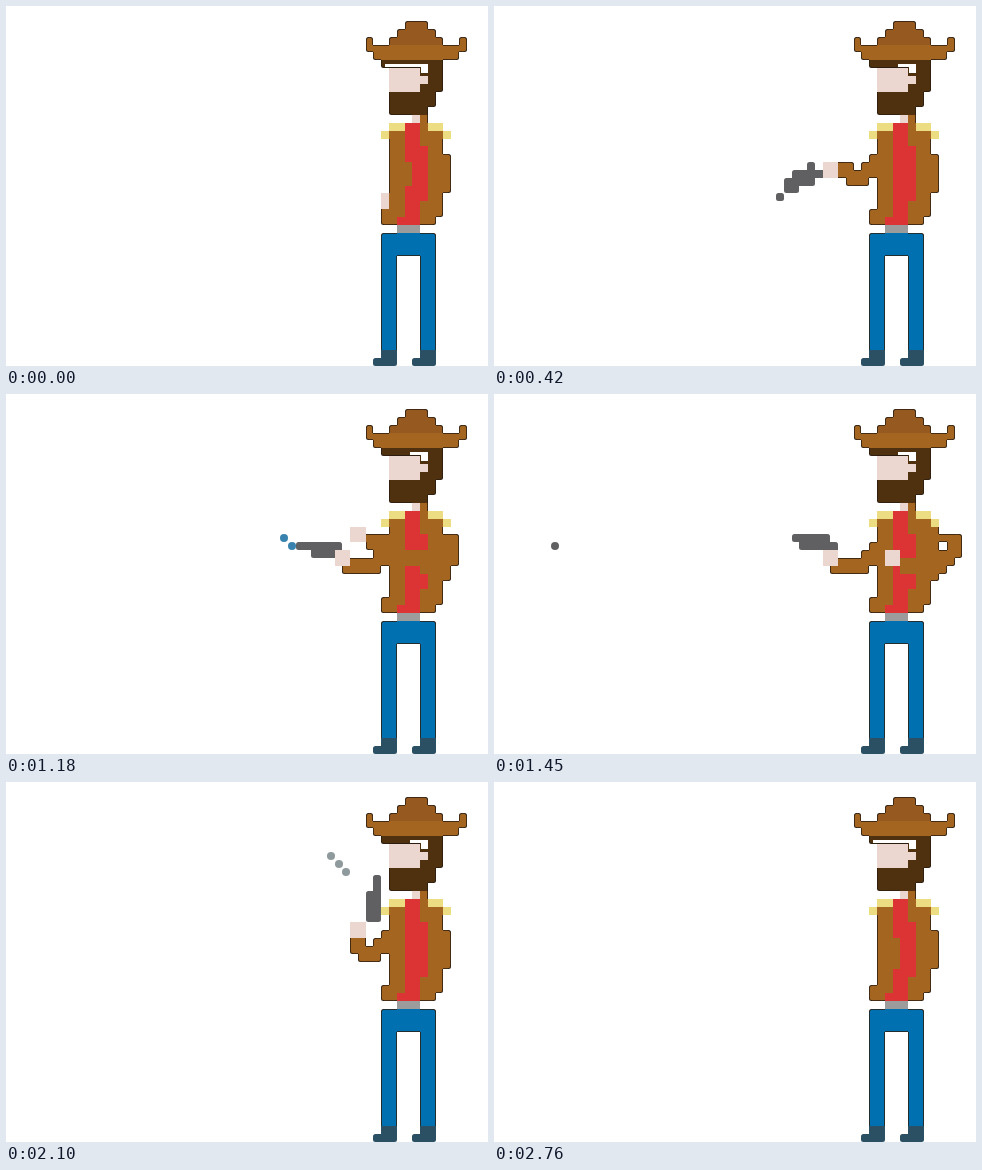
Recreate the animation shown at these times as an HTML page with a canvas. Size 482 px wide and 360 px high, loop 3.26 s.

```html
<!DOCTYPE html>
<html lang="en">
<head>
<meta charset="utf-8">
<title>Cowboy draw</title>
<style>
html, body { margin: 0; width: 100%; height: 100%; overflow: hidden; background: #fff; }
canvas { display: block; width: 482px; height: 360px; }
</style>
</head>
<body>
<canvas id="stage" width="482" height="360"></canvas>
<script>
const ctx = document.getElementById('stage').getContext('2d');
const LOOP = 3260;
const INK = '#2a1d10';
const COLORS = {
  coat: '#a46520', crown: '#965a20', hair: '#4f300f', jeans: '#0070b0', skin: '#ecd7d0', red: '#dc3434',
  gold: '#ecdc82', gun: '#606062', belt: '#9c9c9c', boot: '#2b4f63', puff: '#3882ad', smoke: '#8f9a9c'
};
const OUTLINED = new Set(['coat', 'crown', 'hair', 'jeans']);
const ROUNDED = new Set([...OUTLINED, 'gun', 'boot']);

// Key poses; the values between them are eased.
const front = [
  { t: 100, elbow: [4, 19], hand: [2, 22], turn: -90 },
  { t: 420, elbow: [0, 19], hand: [-4, 18], turn: -45 },
  { t: 500, elbow: [0, 19], hand: [-4, 18], turn: 0 },
  { t: 1400, elbow: [0, 19], hand: [-4, 18], turn: 0 },
  { t: 1680, elbow: [0, 18], hand: [-2, 14], turn: 90 },
  { t: 1840, elbow: [0, 18], hand: [-2, 14], turn: 90 },
  { t: 2080, elbow: [0, 19], hand: [-2, 16], turn: 90 },
  { t: 2400, elbow: [0, 19], hand: [-2, 16], turn: 90 },
  { t: 2520, elbow: [0, 19], hand: [-4, 18], turn: 0 },
  { t: 2760, elbow: [4, 19], hand: [3, 22], turn: -90 }
];
const down = { elbow: [9, 18], hand: [8, 21] };
const hip = { elbow: [12, 16], hand: [6, 19] };
const over = { elbow: [10, 16], hand: [-2, 15] };
const back = [
  { t: 480, ...down }, { t: 620, ...hip }, { t: 660, ...hip }, { t: 900, ...over },
  { t: 1280, ...over }, { t: 1520, ...hip }, { t: 1840, ...hip }, { t: 2040, ...down }
];

const mix = (a, b, k) => Array.isArray(a) ? a.map((v, i) => mix(v, b[i], k)) : a + (b - a) * k;

function poseAt(keys, t) {
  const i = keys.findIndex(p => p.t > t);
  if (i === 0) return keys[0];
  if (i < 0) return keys[keys.length - 1];
  const a = keys[i - 1], b = keys[i];
  const k = (t - a.t) / (b.t - a.t);
  const ease = k * k * (3 - 2 * k);
  return Object.fromEntries(Object.keys(a).map(name => [name, mix(a[name], b[name], ease)]));
}

// The figure is composed on a grid of square cells, then painted.
const X = c => Math.round(359.7 + 7.77 * c);
const Y = c => Math.round(15 + 7.84 * c);
const grid = new Map();
const key = (x, y) => x + ',' + y;

function put(color, x, y, w = 1, h = 1) {
  x = Math.round(x);
  y = Math.round(y);
  for (let i = 0; i < w; i++) {
    for (let j = 0; j < h; j++) grid.set(key(x + i, y + j), { color, x: x + i, y: y + j });
  }
}

function limb(points, h = 2) {
  for (let i = 1; i < points.length; i++) {
    const [a, b] = [points[i - 1], points[i]].map(p => p.map(Math.round));
    const n = Math.max(1, Math.abs(b[0] - a[0]), Math.abs(b[1] - a[1]));
    for (let s = 0; s <= n; s++) put('coat', ...mix(a, b, s / n), 2, h);
  }
}

function paintGrid() {
  for (const { color, x, y } of grid.values()) {
    const free = (dx, dy) => !grid.has(key(x + dx, y + dy));
    const [l, r, u, d] = [free(-1, 0), free(1, 0), free(0, -1), free(0, 1)];
    const radii = [l && u, r && u, r && d, l && d].map(c => c && ROUNDED.has(color) ? 2.5 : 0);
    const block = (fill, edge) => {
      ctx.fillStyle = fill;
      ctx.beginPath();
      ctx.roundRect(X(x) + l * edge, Y(y) + u * edge,
        X(x + 1) - X(x) - (l + r) * edge, Y(y + 1) - Y(y) - (u + d) * edge, radii);
      ctx.fill();
    };
    if (OUTLINED.has(color)) block(INK, 0);
    block(COLORS[color], OUTLINED.has(color) ? 0.8 : 0);
  }
}

function putHead() {
  for (let r = 0; r < 3; r++) put('crown', 5 - r, r, 3 + 2 * r);
  for (const tip of [0, 12]) put('coat', tip, 2);
  for (let r = 0; r < 2; r++) put('coat', r, 3 + r, 13 - 2 * r);
  put('hair', 2, 5, 8);
  put('hair', 3, 6, 7, 3);
  put('hair', 3, 9, 6, 2);
  put('hair', 3, 11, 5);
  put('skin', 3, 6, 4, 3);
  put('skin', 7, 7);
  put('skin', 6, 12);
}

function putLegs() {
  put('belt', 4, 26, 3);
  put('jeans', 2, 27, 7, 3);
  for (const x of [2, 7]) {
    put('jeans', x, 30, 2, 12);
    put('boot', x, 42, 2);
    put('boot', x - 1, 43, 3);
  }
}

function putTorso({ elbow, hand }) {
  put('coat', 3, 14, 7, 11);
  put('coat', 7, 12, 1, 2);
  put('coat', 2, 24, 2, 2);
  put('coat', 4, 25, 5);
  limb([[8, 15], elbow, [8, 20]], 3);
  if (elbow[0] > 11.5) grid.delete(key(11, 17));
  put('red', 5, 13, 2, 12);
  put('red', 7, 16, 1, 7);
  put('red', 4, 25, 3);
  for (const [x, tip] of [[3, 2], [8, 10]]) {
    put('gold', x, 13, 2);
    put('gold', tip, 14);
  }
  if (hand[0] < 7.5) {
    limb([[8, 19], [hand[0] + 2, hand[1] + 1]]);
    put('skin', ...hand, 2, 2);
  }
}

function putFrontArm({ elbow, hand: [x, y], turn }, armed, cocked) {
  const cos = Math.cos(turn * Math.PI / 180), sin = Math.sin(turn * Math.PI / 180);
  limb([[3, 16], elbow, [x + cos, y + 1 + sin]]);
  // u runs along the barrel, v across it.
  const part = (u, v) => put('gun', x + 2 * sin - u * cos + v * sin, y - sin - u * sin - v * cos);
  if (armed) {
    for (let u = 0; u <= 5; u += 0.5) part(u, 1);
    for (let u = 0; u <= 3; u += 0.5) part(u, 0);
    if (cocked) part(-1, 2);
  }
  // The hand slips behind the coat at rest.
  put('skin', x, y, Math.max(0, Math.min(2, 3 - Math.round(x))), 2);
}

function paintFace(calm) {
  const box = (color, x, y, w, h) => {
    ctx.fillStyle = color;
    ctx.fillRect(x, y, w, h);
  };
  const left = calm ? 379 : 404;
  box('#fff', left, 58, 422 - left, 3);
  box('#fff', 415, 58, 7, 9);
  box(INK, 383, 61, 31, 1);
}

function trail(color, x, y, n) {
  ctx.fillStyle = COLORS[color];
  for (let i = 0; i < n; i++) {
    ctx.beginPath();
    ctx.arc(X(x - i) + 4, Y(y - i) + 4, 4, 0, 7);
    ctx.fill();
  }
}

function paintShots(t) {
  const since = from => Math.floor((t - from) / 40);
  if (t >= 860 && t < 1280) {
    const drift = since(860) % 4;
    trail('puff', -10 - drift, 17 - drift, 2);
  }
  if (t >= 1280 && t < 1520) trail('gun', -11 - 7 * since(1280), 17, 1);
  if (t >= 2000 && t < 2300) trail('smoke', -3, 9, Math.min(3, 1 + since(2000)));
}

function draw(t) {
  ctx.fillStyle = '#fff';
  ctx.fillRect(0, 0, 482, 360);
  grid.clear();
  putHead();
  putLegs();
  putTorso(poseAt(back, t));
  putFrontArm(poseAt(front, t), t > 260 && t < 2640, t > 500 && t < 900);
  paintGrid();
  paintFace(t < 100 || t >= 2640);
  paintShots(t);
}

const start = performance.now();
function tick() {
  draw((performance.now() - start) % LOOP);
  requestAnimationFrame(tick);
}
tick();
</script>
</body>
</html>
```
